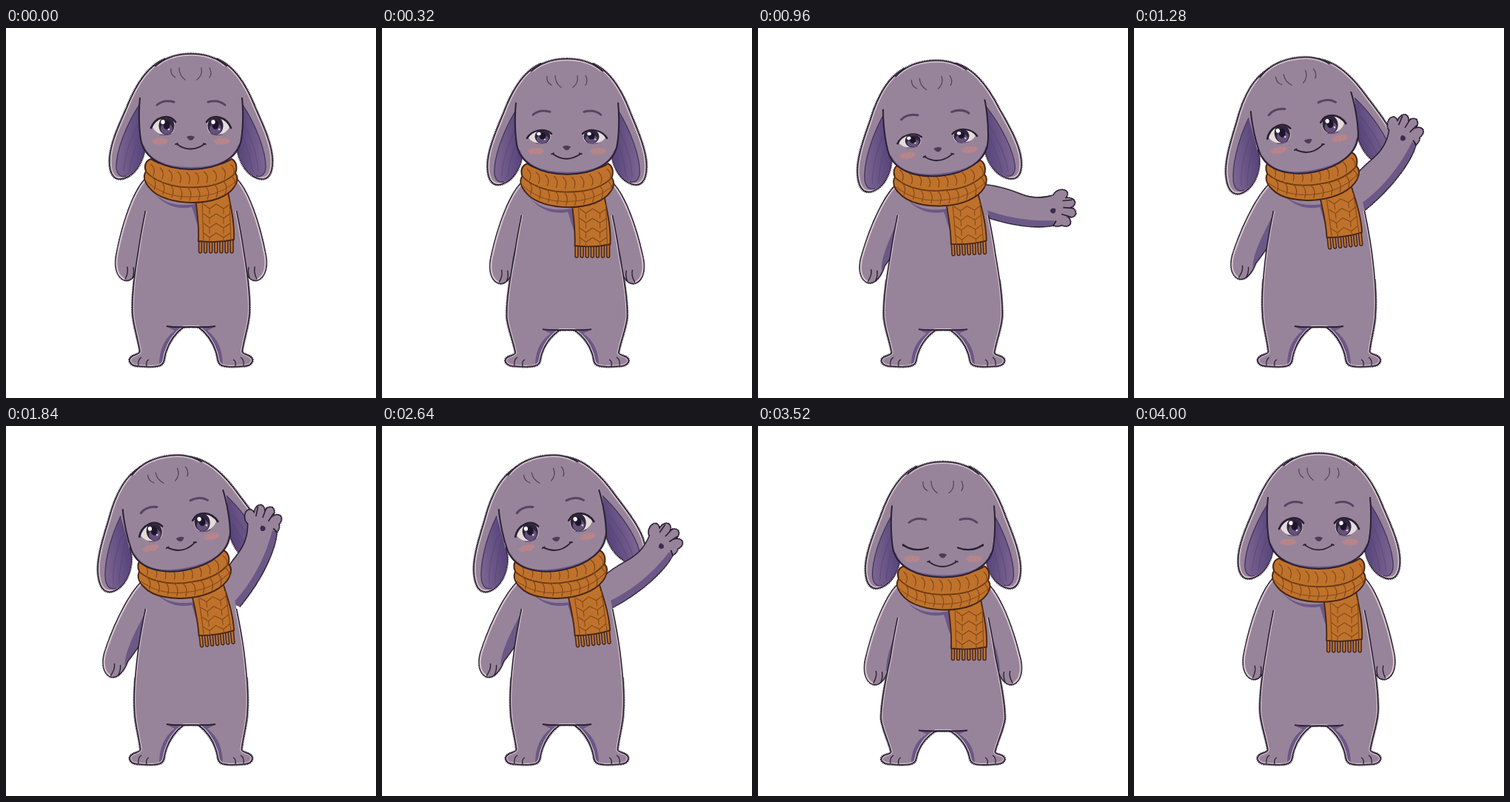
Write an HTML page with a canvas that moves like this. It is 500 px wide and 500 px high and loops after 4.16 s.

```html
<!DOCTYPE html>
<html lang="en">
<head>
<meta charset="utf-8">
<title>Waving bunny</title>
<style>
html, body { margin: 0; width: 100%; height: 100%; overflow: hidden; background: #fff; }
canvas { display: block; }
</style>
</head>
<body>
<canvas id="stage" width="500" height="500"></canvas>
<script>
const ctx = document.getElementById('stage').getContext('2d');
const FUR = '#98849a', SHADE = '#6b5886', INK = '#2a2033', RIM = '#d3c2c8';
const WOOL = '#bf722b', STITCH = '#86491a', WOOL_EDGE = '#482513';
const STEP = 80, LOOP = 4160;

const ease = u => (1 - Math.cos(Math.PI * u)) / 2;
const mix = (a, b, u) => a + (b - a) * u;
const rad = deg => deg * Math.PI / 180;

function group(draw) {
  ctx.save();
  draw();
  ctx.restore();
}

function mirrored(draw) {
  group(() => draw(1));
  group(() => {
    ctx.translate(500, 0);
    ctx.scale(-1, 1);
    draw(-1);
  });
}

function turn(x, y, deg) {
  ctx.translate(x, y);
  ctx.rotate(rad(deg));
  ctx.translate(-x, -y);
}

const path = d => d instanceof Path2D ? d : new Path2D(d);

function fill(d, color) {
  ctx.fillStyle = color;
  ctx.fill(path(d));
}

function line(d, color, width, dash = []) {
  ctx.strokeStyle = color;
  ctx.lineWidth = width;
  ctx.setLineDash(dash);
  ctx.stroke(path(d));
  ctx.setLineDash([]);
}

const dotted = d => line(d, INK, 3.6, [1.2, 1]);

function ellipse(x, y, rx, ry, color) {
  ctx.fillStyle = color;
  ctx.beginPath();
  ctx.ellipse(x, y, rx, ry, 0, 0, 7);
  ctx.fill();
}

function clipTo(d, draw) {
  group(() => {
    ctx.clip(path(d));
    draw();
  });
}

// All movement is a there-and-back run through these poses.
function poseAt(ms) {
  const i = Math.floor(ms % LOOP / STEP);
  const p = i < 2 ? 0 : i === 51 ? 2 : Math.min(i, 52 - i, 25);
  const raise = p <= 8 ? 0 : ease(Math.min(1, (p - 8) / 8));
  const squat = p <= 8 ? ease(p / 8) : 1 - raise;
  const wave = p > 17 ? Math.sin((p - 17) / 8 * 2 * Math.PI) : 0;
  return { raise, squat, wave };
}

function drawEars({ squat, raise }) {
  const ear = 'M215,42C191,51 174,80 163,108C150,137 140,160 140,180' +
    'C140,200 148,207 160,203C178,197 190,172 187,150L200,60Z';
  mirrored(side => {
    turn(200, 55, -2.4 * squat + (side > 0 ? 4 : 2.5) * raise);
    dotted(ear);
    fill(ear, FUR);
    clipTo(ear, () => line(ear, RIM, 5));
    line(ear, INK, 1.5);
    const tone = ctx.createLinearGradient(150, 0, 187, 0);
    tone.addColorStop(0, '#7b6592');
    tone.addColorStop(1, '#57437a');
    fill('M180,104C162,132 149,166 149,188C150,205 166,203 174,193C186,180 189,164 186,146Z', tone);
    line('M180,104C162,132 149,166 149,188C150,200 157,202 162,200', '#493860', 1.4);
    line('M178,130C168,152 160,172 159,194M182,140C175,160 169,176 167,194', '#55427299', 1);
  });
}

function drawArm(x, y, angle, open) {
  ctx.translate(x, y);
  ctx.rotate(rad(angle));
  const outer = open
    ? 'M-20,-13C0,-22 30,-17 50,-12C66,-8 80,-9 96,-17'
    : 'M-20,-13C0,-25 50,-24 90,-18C107,-16 121,-8 121,4';
  const arm = new Path2D(outer + (open
    ? 'L104,-23C116,-18 118,12 112,20C109,24 104,24 100,23C82,30 40,33 -12,19'
    : 'C120,14 105,17 92,15C60,21 25,24 -12,20'));
  if (open) {
    for (const [fx, fy, tilt] of [[104, -18, -0.5], [115, -9, -0.2], [118, 3, 0.1], [113, 15, 0.4]]) {
      const finger = new Path2D();
      finger.ellipse(fx, fy, 9.5, 6.4, tilt, 0, 7);
      arm.addPath(finger);
    }
  }
  dotted(arm);
  line(arm, INK, 2.6);
  fill(arm, FUR);
  clipTo(arm, () => {
    fill(open
      ? 'M-12,9C30,24 72,22 100,17L100,40L-12,40Z'
      : 'M-12,6C40,7 75,4 98,14L98,40L-12,40Z', SHADE);
    if (!open) line(outer, RIM, 4);
  });
  if (open) {
    line('M121,-14L108,-11M125,-3L110,-2M122,9L109,7', INK, 1.6);
    fill('M100,1C95,-1 91,4 95,7C98,9 102,7 100,1Z', '#3c2b50');
    line('M100,24L103,17', INK, 2);
  } else {
    line('M120,4C113,5 107,4 103,1M115,13C109,13 104,11 101,9', INK, 1.4);
  }
}

function drawArms({ squat, raise, wave }) {
  const y = 225 + 10 * squat, rest = 70.6 - 2.6 * squat;
  group(() => drawArm(303, y, mix(rest, -54, raise) + 11.5 * wave, raise > 0.35));
  group(() => {
    ctx.translate(500, 0);
    ctx.scale(-1, 1);
    drawArm(303 + 4 * raise, y + 4 * raise, rest - 8 * raise, false);
  });
}

function drawTorso({ squat, raise }) {
  // Crouching lowers everything above the feet and widens the hips; waving slims them.
  const warp = d => d.replace(/([\d.]+),([\d.]+)/g, (_, x, y) => {
    const drop = 13 * Math.min(1, (457 - y) / 85);
    const bulge = x < 200 ? Math.max(0, 1 - Math.abs(y - 380) / 75) : 0;
    return `${x - bulge * (5 * squat - 3 * raise)},${+y + Math.max(0, drop) * squat}`;
  });
  const half = warp('M250,195C230,195 205,195 196,212C191,235 184,265 179,300' +
    'C174,330 170,365 171,385C172,402 178,418 181,437C181,441 174,441 170,444' +
    'C164,448 167,457 180,457C190,458 203,458 208,456C215,453 213,447 216,438' +
    'C220,425 229,412 240,404L250,404');
  const below = new Path2D();
  below.rect(0, 340, 250, 160);
  const sides = new Path2D();
  sides.rect(0, 247 + 12 * squat, 250, 250);
  mirrored(() => {
    clipTo(below, () => dotted(half));
    fill(half + 'Z', FUR);
    clipTo(half + 'Z', () => {
      fill(warp('M216,403L250,403L250,457L207,457C207,436 213,420 228,409Z'), SHADE);
      clipTo(sides, () => line(half, RIM, 4));
    });
    clipTo(sides, () => line(half, INK, 1.6));
    line(warp('M217,403C230,405 240,404 250,404'), INK, 1.8);
    line('M179,456C178,450 180,447 183,445M190,457C189,452 191,449 193,448', INK, 1.3);
  });
  fill(warp('M199,222C220,243 242,240 260,237L260,268C255,258 254,248 251,242C232,246 214,240 199,222Z'), SHADE);
}

function drawScarf({ squat, raise }) {
  ctx.translate(squat - 7 * raise, 12.5 * squat - 3.5 * raise);
  turn(250, 215, -6 * raise);

  ctx.lineCap = 'round';
  for (let i = 0; i < 7; i++) {
    const x = 262.5 + i * 7.1;
    line(`M${x},285L${x},302`, WOOL_EDGE, 5.4);
    line(`M${x},285L${x},302`, WOOL, 2.4);
  }
  const tail = 'M256,230C259,252 261,268 260,288Q285,291 308,286C309,266 305,246 300,222Z';
  fill(tail, WOOL);
  line(tail, WOOL_EDGE, 1.8);
  clipTo(tail, () => {
    line('M265,232L267,290M302,232L304,290', STITCH, 1.1);
    for (let y = 238; y < 292; y += 13) {
      line(`M267,${y}L275,${y + 6}L284,${y}L294,${y + 6}L303,${y}M275,${y + 6}L275,${y + 13}M294,${y + 6}L294,${y + 13}`, STITCH, 1.1);
    }
  });

  const collar = 'M196,177C187,180 187,188 189,194C185,200 187,208 193,215C204,230 230,236 252,236' +
    'C278,236 300,228 309,214C314,206 313,200 310,196C313,188 311,180 305,177C285,192 215,192 196,177Z';
  fill(collar, WOOL);
  line(collar, WOOL_EDGE, 2);
  clipTo(collar, () => {
    line('M188,193C205,212 235,217 260,215C283,214 301,206 312,194', '#6a3911', 1.8);
    line('M190,207C210,226 235,229 255,228C280,227 298,219 312,206', STITCH, 1);
    for (let i = 0; i < 10; i++) {
      const x = 196 + i * 12, sag = 24 * (1 - ((x - 250) / 62) ** 2);
      line(`M${x},${181 + sag * 0.6}q7,6 3,15M${x + 1},${196 + sag * 0.8}q8,7 3,18`, STITCH, 1.2);
    }
  });
}

function drawEye(x, side, open) {
  if (open < 0.2) {
    line(`M${x - 20 * side},134Q${x - 5 * side},145 ${x + 14 * side},138`, INK, 2.2);
    line(`M${x - 17 * side},136l${-3 * side},-1`, INK, 2);
    return;
  }
  ctx.translate(x, 138);
  ctx.scale(side, open);
  const white = 'M-18,-4C-13,-18 5,-21 12,-10C13,1 9,6 1,6C-9,6 -14,3 -18,-4Z';
  fill(white, '#e3dcd9');
  clipTo(white, () => {
    ellipse(1, -6, 10.5, 12.5, '#30243e');
    ellipse(1, -2, 8, 7.5, '#66517c');
    ellipse(1, -7, 4.5, 6, '#1d1628');
  });
  ellipse(-4 * side, -11, 2.7, 3, '#fff');
  ellipse(4 * side, -1, 1.3, 1.3, '#d8cce2');
  line('M-20,-3C-14,-18 4,-23 13,-11', INK, 2.8);
  line('M-8,6Q1,8 7,5', '#5a4768', 1);
}

function drawFace({ squat }) {
  ctx.lineCap = 'round';
  group(() => {
    ctx.translate(0, 7 * squat);
    line('M223,55q-1,8 6,12M234,54q0,10 8,16M264,54q2,10 -6,16M275,54q4,7 0,13', '#55445f', 1.3);
  });
  ctx.translate(0, 13 * squat);
  const open = 1 - squat ** 2;
  [[216, 1], [284, -1]].forEach(([x, side]) => {
    ellipse(x - 8 * side, 153, 11, 4.5, '#c5878388');
    line(`M${x - 8 * side - 7},156l4,-6m2,6l4,-6m2,6l4,-6`, '#cf827a', 1.1);
    group(() => drawEye(x, side, open));
    line(`M${x - 12 * side},104Q${x - 3 * side},96 ${x + 11 * side},100`, '#5b4365', 3);
  });
  fill('M244,147Q249,144 255,147Q253,152 249,152Q246,151 244,147Z', '#4d3c57');
  line('M231,157Q249,170 268,157M229,157l3,-1M267,156l3,1', INK, 1.8);
}

function inHead({ squat, raise }, draw) {
  group(() => {
    ctx.translate(-17.5 * raise, 13.5 * squat + 4.5 * raise);
    turn(250, 131, -11 * raise);
    draw();
  });
}

function drawHead(pose) {
  const skull = 'M250,35C215,35 193,53 183,82C179,100 179,130 182,150C186,177 215,191 250,191' +
    'C285,191 314,177 318,150C321,130 321,100 317,82C307,53 285,35 250,35Z';
  const crown = new Path2D(), jaw = new Path2D();
  crown.rect(100, 0, 300, 52);
  jaw.rect(100, 94, 300, 120);
  clipTo(crown, () => dotted(skull));
  fill(skull, FUR);
  clipTo(crown, () => {
    clipTo(skull, () => line(skull, RIM, 5));
    line(skull, INK, 1.5);
  });
  clipTo(skull, () => line('M184,158C193,184 222,190 250,190C278,190 307,184 316,158', SHADE, 4));
  clipTo(jaw, () => line(skull, INK, 2));
  drawFace(pose);
}

function render() {
  const pose = poseAt(performance.now());
  ctx.fillStyle = '#fff';
  ctx.fillRect(0, 0, 500, 500);
  inHead(pose, () => drawEars(pose));
  drawArms(pose);
  drawTorso(pose);
  group(() => drawScarf(pose));
  inHead(pose, () => drawHead(pose));
  requestAnimationFrame(render);
}
render();
</script>
</body>
</html>
```
